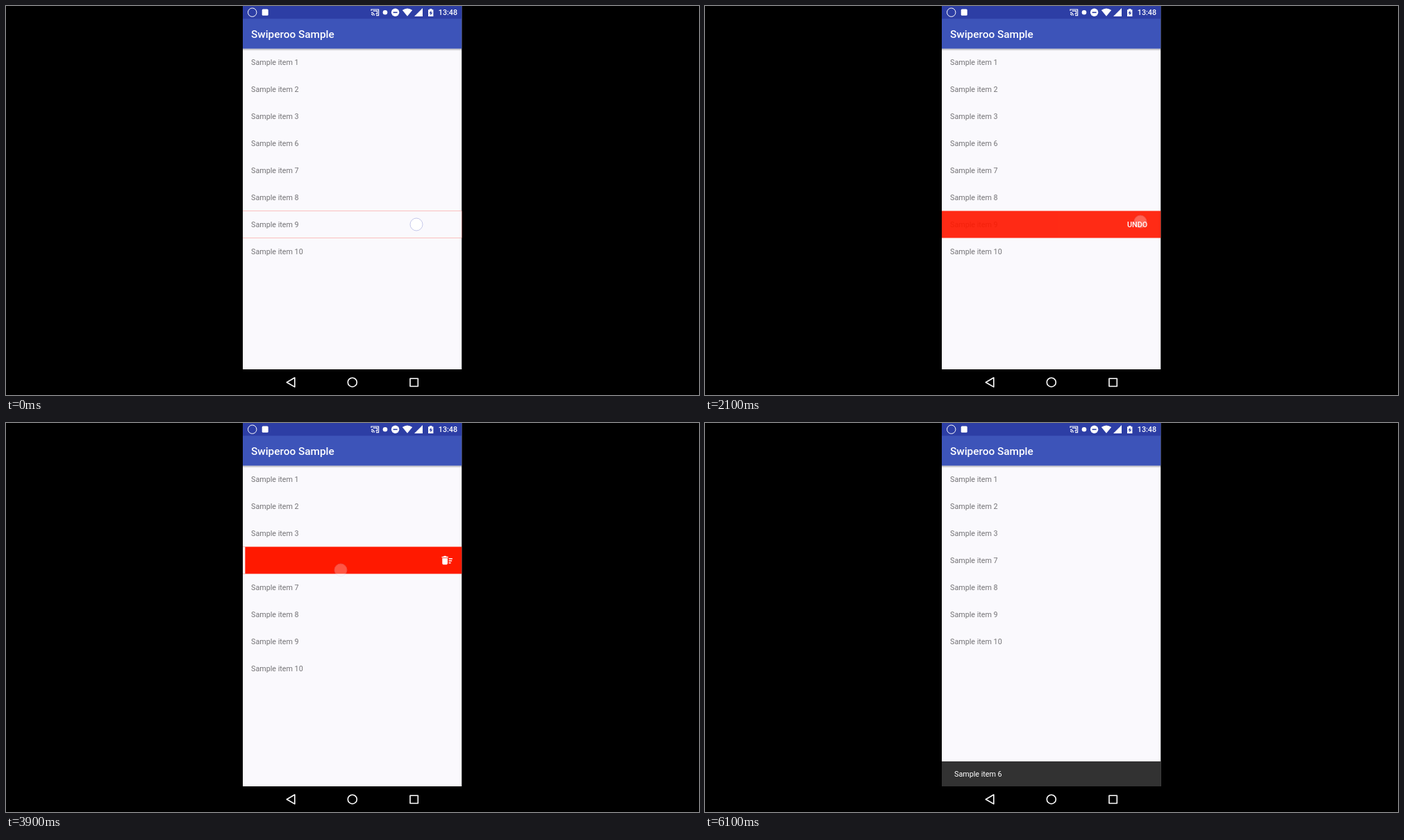
Write an HTML page that moves like this. It is 998 px wide and 561 px high and loops after 6.2 s.

```html
<!DOCTYPE html>
<html lang="en">
<head>
<meta charset="utf-8">
<style>
html, body { margin: 0; width: 100%; height: 100%; overflow: hidden; background: #000; }
svg { display: block; width: 100%; height: 100%; }
text { font: 10.75px Roboto, sans-serif; fill: #fff; }
.item { fill: #747376; }
.bold { font-weight: 500; }
</style>
</head>
<body>
<svg viewBox="0 0 998 561">
  <defs>
    <clipPath id="screen"><rect x="341" width="315.5" height="524"/></clipPath>
    <linearGradient id="shade" x2="0" y2="1">
      <stop stop-color="#000" stop-opacity=".3"/>
      <stop offset="1" stop-color="#000" stop-opacity="0"/>
    </linearGradient>
  </defs>

  <g clip-path="url(#screen)">
    <rect x="341" width="315.5" height="524" fill="#faf9fd"/>
    <g id="list"></g>
    <g id="panel">
      <rect x="341" y="-19.5" width="315.5" height="39" fill="#ff1900"/>
      <path id="trash" transform="translate(626 -9.2) scale(.768)" fill="#fff"
        d="M15 16h4v2h-4zm0-8h7v2h-7zm0 4h6v2h-6zM3 18c0 1.1.9 2 2 2h6c1.1 0 2-.9 2-2V8H3zM14 5h-3l-1-1H6L5 5H2v2h12z"/>
      <text id="undo" class="bold" y="3.9">UNDO</text>
    </g>
    <g id="card">
      <rect x="341" y="-19.5" width="315.5" height="39" fill="#faf9fd"/>
      <text id="cardText" class="item" x="353" y="3.9"></text>
    </g>
    <g id="snack">
      <rect x="341" y="488" width="315.5" height="36" fill="#323232"/>
      <text x="359" y="510.4">Sample item 6</text>
    </g>
    <rect x="341" y="61.4" width="315.5" height="3.4" fill="url(#shade)"/>
    <rect x="341" width="315.5" height="61.5" fill="#3d54b9"/>
    <rect x="341" width="315.5" height="18.4" fill="#2d3ea5"/>
    <text class="bold" x="353" y="45.9" style="font-size:15.36px">Swiperoo Sample</text>
    <circle id="touch" r="9" fill="#fff" stroke="#c5c8ea"/>
  </g>

  <!-- status bar -->
  <g fill="#fff">
    <circle cx="354.7" cy="9.2" r="6.2" fill="none" stroke="#fff"/>
    <rect x="368.7" y="4.4" width="9" height="9.4" rx="1.5"/>
    <g fill="none" stroke="#fff" stroke-width="1.2">
      <path d="M526 7V5h10.6v8.6H533M526 9.4a4.4 4.4 0 0 1 4.4 4.4M526 11.6a2.2 2.2 0 0 1 2.2 2.2"/>
      <path d="M528.5 7.2h6v4.2h-2"/>
    </g>
    <circle cx="546" cy="9.3" r="3.3"/>
    <circle cx="560.6" cy="9.3" r="5.7"/>
    <rect x="557.6" y="8.5" width="6" height="1.6" fill="#2d3ea5"/>
    <path d="M578 14.8L570.8 6Q578 1 585.2 6zM588 15L600 3V15z"/>
    <path d="M608 5.2h2V4h3.4v1.200h2V15H608z"/>
    <path d="M612.4 6.400l-3 4h1.900v3.200l3-4.200h-1.900z" fill="#2d3ea5"/>
    <text class="bold" x="622.8" y="13.4">13:48</text>
  </g>

  <!-- navigation bar -->
  <g fill="none" stroke="#fff" stroke-width="1.6" stroke-linejoin="round">
    <path d="M404.300 542.700L415.800 536v13.400z"/>
    <circle cx="498.800" cy="542.700" r="6.500"/>
    <rect x="582" y="537.200" width="11.300" height="11.300"/>
  </g>
</svg>

<script>
const LOOP = 6200, TICK = 50, WIDTH = 315.5, ROW = 39, DRAG = 118;
const el = id => document.getElementById(id);
const [list, panel, trash, undo, card, cardText, snack, touch] =
  ['list', 'panel', 'trash', 'undo', 'card', 'cardText', 'snack', 'touch'].map(el);

const ramp = (t, start, length) => Math.min(1, Math.max(0, (t - start) / length));
const ease = p => (1 - Math.cos(Math.PI * p)) / 2;
const slide = (t, start, length) => ease(ramp(t, start, length));
const rowY = i => 81 + ROW * i;
const move = (node, x, y) => node.setAttribute('transform', `translate(${x} ${y})`);

const items = [1, 2, 3, 6, 7, 8, 9, 10].map(n => {
  const node = document.createElementNS('http://www.w3.org/2000/svg', 'text');
  node.textContent = 'Sample item ' + n;
  node.setAttribute('class', 'item');
  node.setAttribute('x', 353);
  node.setAttribute('y', 3.9);
  return list.appendChild(node);
});

// Each swipe: row, touch-down time, panel fade time, touch start and vertical drift
const swipes = [
  { row: 6, down: 0, fade: 2055, x: 591, y: 315, drift: 7 },
  { row: 3, down: 2960, fade: 4848, x: 600, y: 203, drift: 9 }
];

function drawTouch(t, s, drag) {
  const tap = t >= 1780 && t < 2700;
  const down = tap ? 1780 : s.down, up = tap ? 1880 : s.down + 720;
  if (tap) move(touch, 627, 311);
  else move(touch, s.x - DRAG * drag, s.y + s.drift * drag);
  touch.style.opacity = t < down ? 0 : 1 - ramp(t, up, 300);
}

function draw(t) {
  const s = swipes[t < 2800 ? 0 : 1], y = rowY(s.row), since = t - s.down;
  const drag = slide(since, 130, 550);
  const fling = slide(since, 720, 240);
  const enter = slide(since, 1150, 500);
  const removed = t > 4000;

  const shift = slide(t, 5510, 250) * ROW;
  items.forEach((node, i) => {
    move(node, 0, rowY(i) - (i > 3 ? shift : 0));
    node.style.opacity = i === 3 && removed ? 0 : 1;
  });

  move(panel, 0, y);
  panel.style.opacity = since < 0 ? 0 : 1 - ramp(t, s.fade, 540);
  trash.style.opacity = 1 - ramp(since, 1450, 250);
  undo.setAttribute('x', 386 + 222 * enter);
  undo.style.opacity = Math.min(1, enter * 1.2);

  move(card, -DRAG * drag - (WIDTH - DRAG) * fling, y);
  card.style.opacity = fling < 1 ? 1 : 0;
  cardText.textContent = items[s.row].textContent;

  const rise = 1 - (1 - ramp(t, 4850, 250)) ** 3;
  move(snack, 0, 36 * (1 - rise));
  drawTouch(t, s, drag);
}

let begin;
function frame(now) {
  begin ??= now;
  draw(Math.floor((now - begin) % LOOP / TICK) * TICK);
  requestAnimationFrame(frame);
}
draw(0);
requestAnimationFrame(frame);
</script>
</body>
</html>
```
